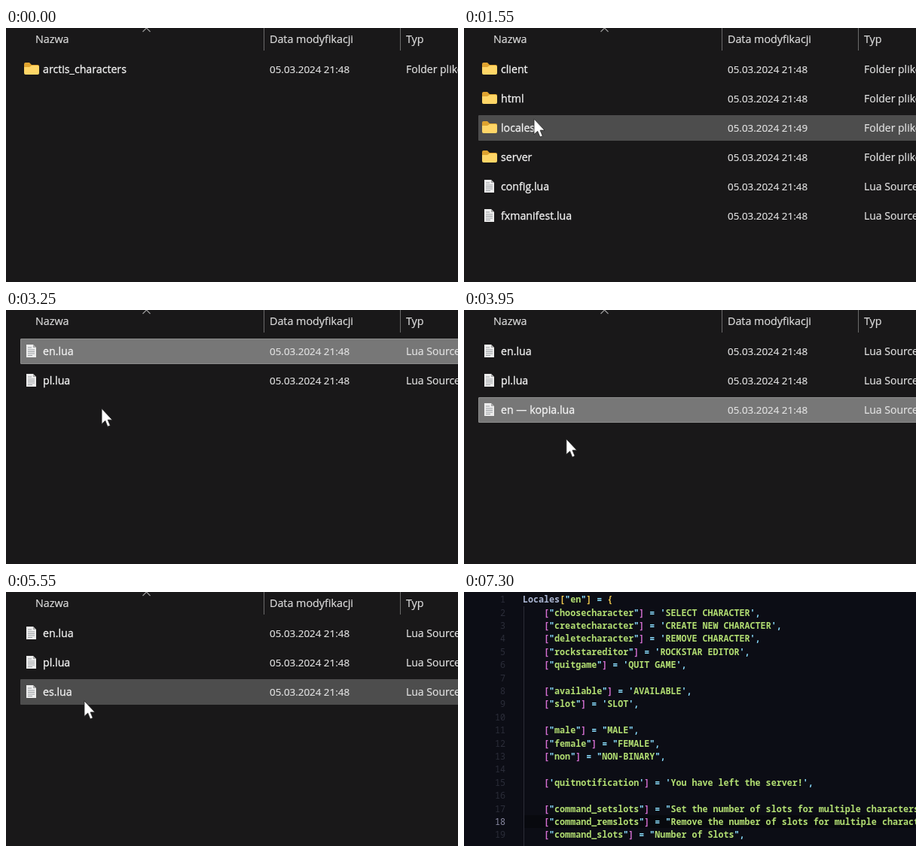
Write an HTML page that moves like this. It is 600 by 338 pixels and loops after 8000 ms.

```html
<!DOCTYPE html>
<html lang="pl">
<head>
<meta charset="utf-8">
<title>Locale files</title>
<style>
html, body { margin: 0; width: 100%; height: 100%; overflow: hidden; background: #191819; }
#stage { position: relative; width: 600px; height: 338px; overflow: hidden; background: #191819;
  color: #e2e2e2; font: 14px/34px "Open Sans", "Noto Sans", sans-serif; white-space: nowrap;
  -webkit-text-stroke: .2px; }
#stage div, #stage svg { position: absolute; }
.head { top: -2px; font-size: 14.3px; color: #dcdcdc; }
.rule { top: 0; width: 1px; height: 30px; background: #6a6a6a; }
.bar { left: 19px; top: 38px; width: 600px; height: 34px; box-sizing: border-box;
  border-radius: 1px; background: #4d4d4d; }
#sel { border: 1px solid #8c8c8c; background: #777; }
.layer { left: 0; top: 0; }
.row { left: 0; width: 600px; height: 34px; }
.name { left: 49px; top: 0; font-size: 14.2px; color: #f2f2f2; white-space: pre; -webkit-text-stroke: .3px; }
.date { left: 350px; top: 0; font-size: 13.4px; }
.type { left: 531px; top: 0; }
.field { left: 44px; top: 5px; width: 145px; height: 24px; box-sizing: border-box;
  border: 2px solid #f4f4f4; background: #191819; }
.mark { display: inline-block; height: 20px; line-height: 20px; background: #1c74d2; }
.caret { box-shadow: 1px 0 #e08a3a; }
.typed { box-shadow: 1px 0 #f2f2f2; display: inline-block; height: 18px; line-height: 18px; }
#editor { inset: 0; background: #0c0d15; color: #a9b4d0; white-space: pre; -webkit-text-stroke: 0;
  font: 600 11.7px/17.4px "Noto Sans Mono", "DejaVu Sans Mono", monospace; }
#editor .num { left: 20px; width: 35px; text-align: right; color: #2b2d39; font-weight: 400; }
#editor .now { color: #8d8da6; }
#editor .code { left: 78px; }
.s { color: #b2de72; } .q { color: #89ddff; } .b { color: #d56fd2; } .y { color: #f2cb4e; }
</style>
</head>
<body>
<div id="stage">
  <div class="head" style="left:39px">Nazwa</div>
  <div class="head" style="left:350px">Data modyfikacji</div>
  <div class="head" style="left:531px">Typ</div>
  <div class="rule" style="left:342px"></div>
  <div class="rule" style="left:523px"></div>
  <svg style="left:180px;top:0" width="13" height="6"><path d="M1.5 5 6.5 0 11.5 5" fill="none" stroke="#9a9a9a" stroke-width="1.2"/></svg>
  <div class="bar" id="hover"></div>
  <div class="bar" id="sel"></div>
  <div class="layer" id="views"></div>
  <svg id="cursor" width="20" height="30" style="left:-2px;top:-2px"><path transform="translate(2 2)" d="M0 0V20.5L4.7 16.2 7.9 24 11.3 22.6 8.1 15H14Z" fill="#fff" stroke="#222" stroke-width=".8"/></svg>
  <div id="editor"></div>
</div>
<script>
const LOOP = 8000;
const $ = id => document.getElementById(id);

const folderIcon = `<svg style="left:23px;top:8px" width="22" height="18">
  <path d="M1 2Q1 0 3 0H8L11 3H19Q21 3 21 5V14H1Z" fill="#dfa32f"/>
  <path d="M1 6H8L11 4H19Q21 4 21 6V14Q21 16 19 16H3Q1 16 1 14Z" fill="#ffd667"/></svg>`;
const fileIcon = `<svg style="left:26px;top:7px" width="15" height="19">
  <path d="M1 1H10L14 5V18H1Z" fill="#ececec"/><path d="M10 1V5H14Z" fill="#a9a9a9"/>
  <path d="M3 5H8M3 8H12M3 10.5H12M3 13H12M3 15.5H9" stroke="#9b9fa3"/></svg>`;

const shown = (from, to, html) => `<div class="layer" data-on="${from},${to}">${html}</div>`;
const nameTag = html => `<div class="name">${html}</div>`;

function row(i, label, isFile, min = 48) {
  return `<div class="row" style="top:${38 + 39 * i}px">${isFile ? fileIcon : folderIcon}${label}
    <div class="date">05.03.2024 21:${min}</div>
    <div class="type">${isFile ? 'Lua Source File' : 'Folder plików'}</div></div>`;
}

const listing = names => names.map((name, i) =>
  row(i, nameTag(name), name.endsWith('.lua'), name === 'locales' ? 49 : 48)).join('');

const label = (from, to, html) => shown(from, to, nameTag(html));
const copyName =
  label(3900, 4300, 'en — kopia.lua') +
  shown(4300, 5050, '<div class="field"></div>') +
  label(4300, 4800, '<span class="mark caret">en — kopia</span>.lua') +
  label(4800, 4930, '<span class="typed">e</span>.lua') +
  label(4930, 5050, '<span class="typed">es</span>.lua') +
  label(5050, LOOP, 'es.lua');

$('views').innerHTML =
  shown(0, 1000, listing(['arctis_characters'])) +
  shown(1000, 1800, listing(['client', 'html', 'locales', 'server', 'config.lua', 'fxmanifest.lua'])) +
  shown(1800, LOOP, listing(['en.lua', 'pl.lua'])) +
  shown(3900, LOOP, row(2, copyName, true));

const code = `Locales["en"] = {
    ["choosecharacter"] = 'SELECT CHARACTER',
    ["createcharacter"] = 'CREATE NEW CHARACTER',
    ["deletecharacter"] = 'REMOVE CHARACTER',
    ["rockstareditor"] = 'ROCKSTAR EDITOR',
    ["quitgame"] = 'QUIT GAME',

    ["available"] = 'AVAILABLE',
    ["slot"] = 'SLOT',

    ["male"] = "MALE",
    ["female"] = "FEMALE",
    ["non"] = "NON-BINARY",

    ['quitnotification'] = 'You have left the server!',

    ["command_setslots"] = "Set the number of slots for multiple characters",
    ["command_remslots"] = "Remove the number of slots for multiple characters",
    ["command_slots"] = "Number of Slots",`;

const span = (cls, text) => `<span class="${cls}">${text}</span>`;
function paint(line, i) {
  return line.replace(/(["'])(.*?)\1|[\[\]{]|[=,]/g, (m, quote, text) =>
    quote ? span('q', quote) + span('s', text) + span('q', quote)
      : '=,'.includes(m) ? span('q', m)
      : span(i ? 'b' : 'y', m));
}

$('editor').innerHTML =
  '<div style="left:79px;top:297px;width:521px;height:17px;background:#08090e"></div>' +
  '<div style="left:79px;top:19px;width:1px;height:319px;background:#2b2d37"></div>' +
  code.split('\n').map((line, i) => {
    const top = `style="top:${(1.3 + 17.39 * i).toFixed(2)}px"`;
    return `<div class="num${i === 17 ? ' now' : ''}" ${top}>${i + 1}</div>` +
      `<div class="code" ${top}>${paint(line, i)}</div>`;
  }).join('');

// time, x, y of the pointer tip
const path = [
  [400, 612, 150], [560, 430, 120], [800, 100, 54], [1000, 98, 54], [1200, 94, 82],
  [1550, 93, 121], [1650, 94, 128], [1800, 94, 128], [1950, 95, 108], [2060, 97, 88],
  [2250, 100, 69], [2500, 99, 60], [2930, 99, 60], [3250, 127, 131], [3600, 136, 172],
  [4550, 135, 171], [4900, 132, 185], [5150, 126, 206], [5250, 126, 206], [5400, 118, 176],
  [5550, 104, 145], [5750, 98, 133], [5950, 98, 133], [6150, 95, 131]
];

// time, row; -1 hides the bar
const hoverAt = [[0, -1], [700, 0], [1150, 1], [1500, 2], [1800, -1], [1950, 1], [2120, 0],
  [3070, 1], [3170, -1], [5510, 2]];
const selAt = [[0, -1], [850, 0], [1000, -1], [1680, 2], [1800, -1], [2900, 0], [3900, 2],
  [5200, -1], [5950, 2]];

const last = (list, t) => list.filter(k => k[0] <= t).pop();

function slope(i, axis) {
  if (i === 0 || i === path.length - 1) return 0;
  const rate = j => (path[j + 1][axis] - path[j][axis]) / (path[j + 1][0] - path[j][0]);
  const a = rate(i - 1), b = rate(i);
  return a * b > 0 ? 2 * a * b / (a + b) : 0;
}

function along(t, axis) {
  const i = path.findIndex(p => p[0] > t);
  if (i < 0) return path[path.length - 1][axis];
  if (i === 0) return path[0][axis];
  const p = path[i - 1], q = path[i], d = q[0] - p[0], u = (t - p[0]) / d;
  const ease = u * u * (3 - 2 * u);
  return p[axis] + (q[axis] - p[axis]) * ease +
    d * u * (1 - u) * ((1 - u) * slope(i - 1, axis) - u * slope(i, axis));
}

function setBar(bar, index) {
  bar.style.visibility = index < 0 ? 'hidden' : 'visible';
  bar.style.transform = `translateY(${39 * index}px)`;
}

const timed = [...document.querySelectorAll('[data-on]')]
  .map(el => [el, ...el.dataset.on.split(',').map(Number)]);

function draw(t) {
  for (const [el, from, to] of timed) el.style.display = t >= from && t < to ? '' : 'none';
  setBar($('hover'), last(hoverAt, t)[1]);
  setBar($('sel'), last(selAt, t)[1]);
  const dim = (t >= 4300 && t < 5050) || (t >= 5950 && t < 6350);
  $('sel').style.background = dim ? '#686868' : '#777';
  $('cursor').style.visibility = t < 400 ? 'hidden' : 'visible';
  $('cursor').style.transform = `translate(${along(t, 1)}px, ${along(t, 2)}px)`;
  $('editor').style.opacity = Math.min(1, Math.max(0, (t - 7080) / 200));
}

const start = performance.now();
function tick() {
  draw((performance.now() - start) % LOOP);
  requestAnimationFrame(tick);
}
tick();
</script>
</body>
</html>
```
